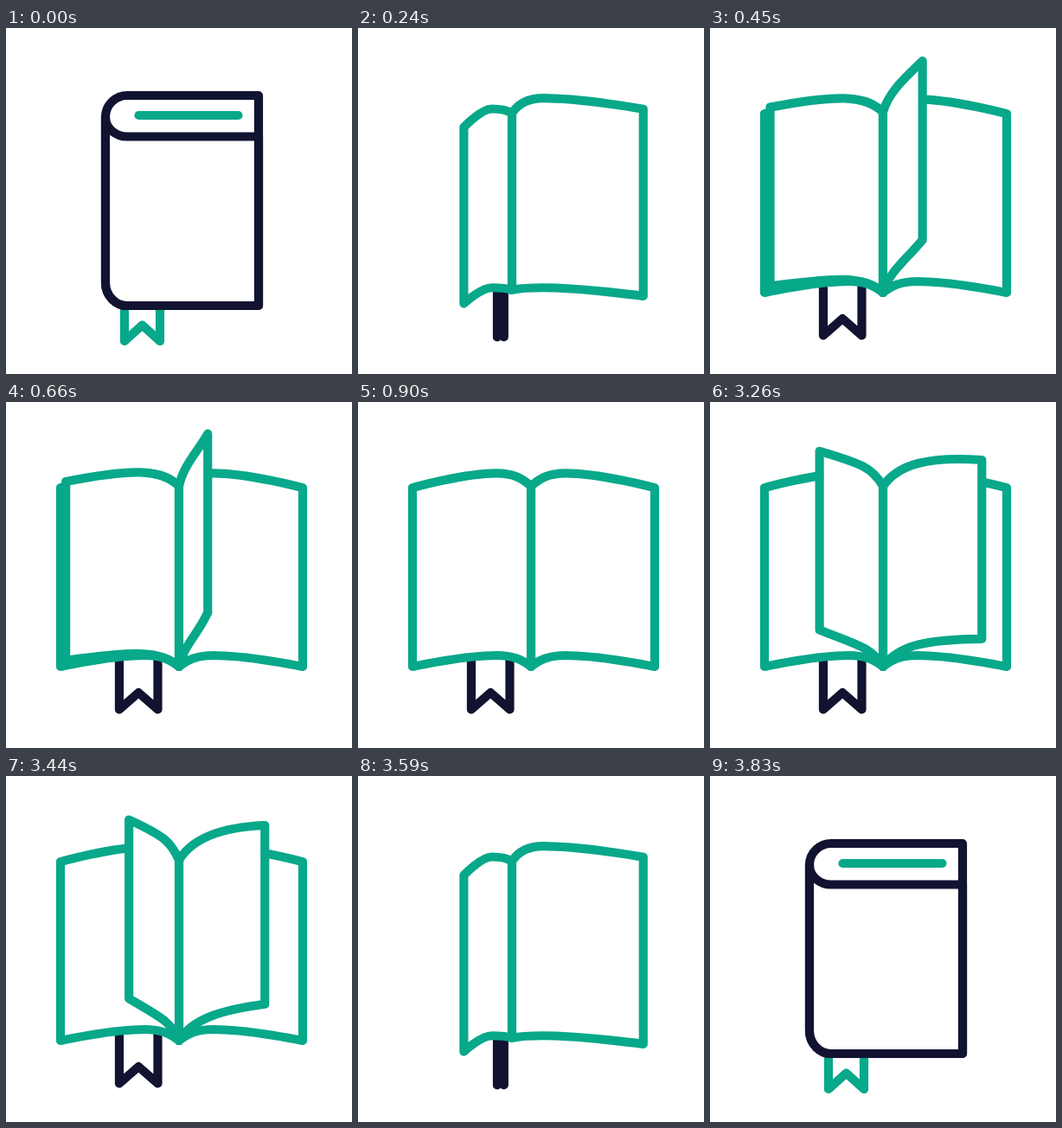
An HTML page that plays this animation: 400x400 px, repeating every 4860 ms.

```html
<!DOCTYPE html>
<html lang="en">
<head>
<meta charset="utf-8">
<title>Book</title>
<style>
  html, body { margin: 0; width: 100%; height: 100%; overflow: hidden; background: #fff; }
  svg { display: block; width: 100vw; height: 100vh; }
  path { fill: #fff; stroke-width: 10.2; stroke-linecap: round; stroke-linejoin: round; }
</style>
</head>
<body>
<svg id="stage" viewBox="0 0 400 400"></svg>
<script>
const DARK = '#121331', GREEN = '#08a88a';
const LOOP = 4860, STEP = 30, STEPS = 30, CLOSE_AT = 2930, UNFOLD = 12;

// Each half of the book: spine, crest and outer corner.
const OPEN = { top: [97.3, 82.3, 99.2], foot: [306, 293, 306] };
const SHUT = { x: [115, 140, 292], foot: [294, 321, 321] };
const BACK = { shut: { ...SHUT, top: [103, 78, 78] }, open: { ...OPEN, x: [200, 240, 343] } };
const COVER = { shut: { ...SHUT, top: [103, 125.5, 125.5] }, open: { ...OPEN, x: [200, 160, 63] } };

// First and last step of each turning page.
const PAGES = [[8, 15.7], [9.6, 23.2], [16.4, 29.5]];

const lerp = (a, b, k) => a + (b - a) * k;
const mix = (a, b, k) => a.map((v, i) => lerp(v, b[i], k));
const smooth = v => { v = Math.min(1, Math.max(0, v)); return v * v * (3 - 2 * v); };
const stage = document.getElementById('stage');

const shape = (d, color, fill = '#fff') => `<path d="${d}" stroke="${color}" style="fill:${fill}"/>`;

function morph({ shut, open }, p, drop = 0) {
  const half = {};
  for (const key of ['x', 'top', 'foot']) half[key] = mix(shut[key], open[key], p);
  half.top[2] += drop;
  half.foot[2] += drop;
  return half;
}

// Points from spine to corner: a rounded shoulder, then a shallow sweep.
function edge([sx, mx, px], [sy, my, py], p) {
  const dx = mx - sx, dy = my - sy;
  return [[sx, sy], [sx + dx * p / 4, sy + dy * .6], [mx - dx / 2, my],
    [mx, my], [lerp(mx, px, .39), my], [px, py], [px, py]];
}

// Closed outline from a top edge and a foot edge, each a chain of cubic curves.
function outline(top, foot) {
  const chain = ([first, ...rest]) => `${first}C${rest.join(' ')}`;
  return `M${chain(top)}L${chain(foot.reverse())}Z`;
}

const halfPath = ({ x, top, foot }, p) => outline(edge(x, top, p), edge(x, foot, p));

function leafPath(u, back, cover) {
  const x = back.x[0], y = back.top[0], foot = back.foot[0];
  const lift = 74 * (1 - .31 * u) * (4 * u * (1 - u)) ** .8;
  const cornerX = lerp(back.x[2], cover.x[2], u), reach = cornerX - x;
  const curve = (base, tip) => [
    [x, base],
    [x + 22 * (1 - 2 * u), base - 26 + 6 * u],
    [x + reach * .42 + lift / 8, base - 20 - lift * (.5 - .45 * u)],
    [cornerX, tip - lift]
  ];
  const bottom = curve(foot, 306);
  bottom[2][1] += 3;
  return outline(curve(y, OPEN.top[2]), bottom);
}

function ribbonPath(spine, width, p, swing) {
  const near = spine + width * lerp(.124, .179, p);
  const far = spine + width * (lerp(.356, .504, p) - .22 * swing);
  const top = lerp(315, 298, p), end = lerp(362, 355.5, p), notch = lerp(343.5, 336, p);
  return `M${near} ${top}V${end}L${(near + far) / 2} ${notch}L${far} ${end}V${top}`;
}

function render(step) {
  const p = smooth(step / UNFOLD), swing = Math.sin(Math.PI * p);
  const back = morph(BACK, p), cover = morph(COVER, p, 12 * swing);
  const spine = back.x[0], width = cover.x[2] - spine;
  const [book, ribbon] = width < 0 ? [GREEN, DARK] : [DARK, GREEN];

  const parts = [
    shape(ribbonPath(spine, width, p, swing), ribbon, 'none'),
    shape(halfPath(back, p), book)
  ];
  const label = 115 * (1 - p / .4);
  if (label > 0) parts.push(shape(`M${spine + 38.5} 101h${label}`, GREEN, 'none'));
  parts.push(shape(halfPath(cover, p), book));

  // The page nearest to upright lies on top.
  PAGES.map(([from, to]) => smooth((step - from) / (to - from)))
    .filter(u => u > 0 && u < 1)
    .sort((a, b) => Math.abs(b - .5) - Math.abs(a - .5))
    .forEach(u => parts.push(shape(leafPath(u, back, cover), GREEN)));

  stage.innerHTML = parts.join('');
}

const begin = performance.now();
function tick() {
  const t = (performance.now() - begin) % LOOP;
  const opened = Math.min(STEPS, Math.floor(t / STEP));
  const closed = Math.min(STEPS, Math.max(0, Math.floor((t - CLOSE_AT) / STEP)));
  render(opened - closed);
  requestAnimationFrame(tick);
}
tick();
</script>
</body>
</html>
```
